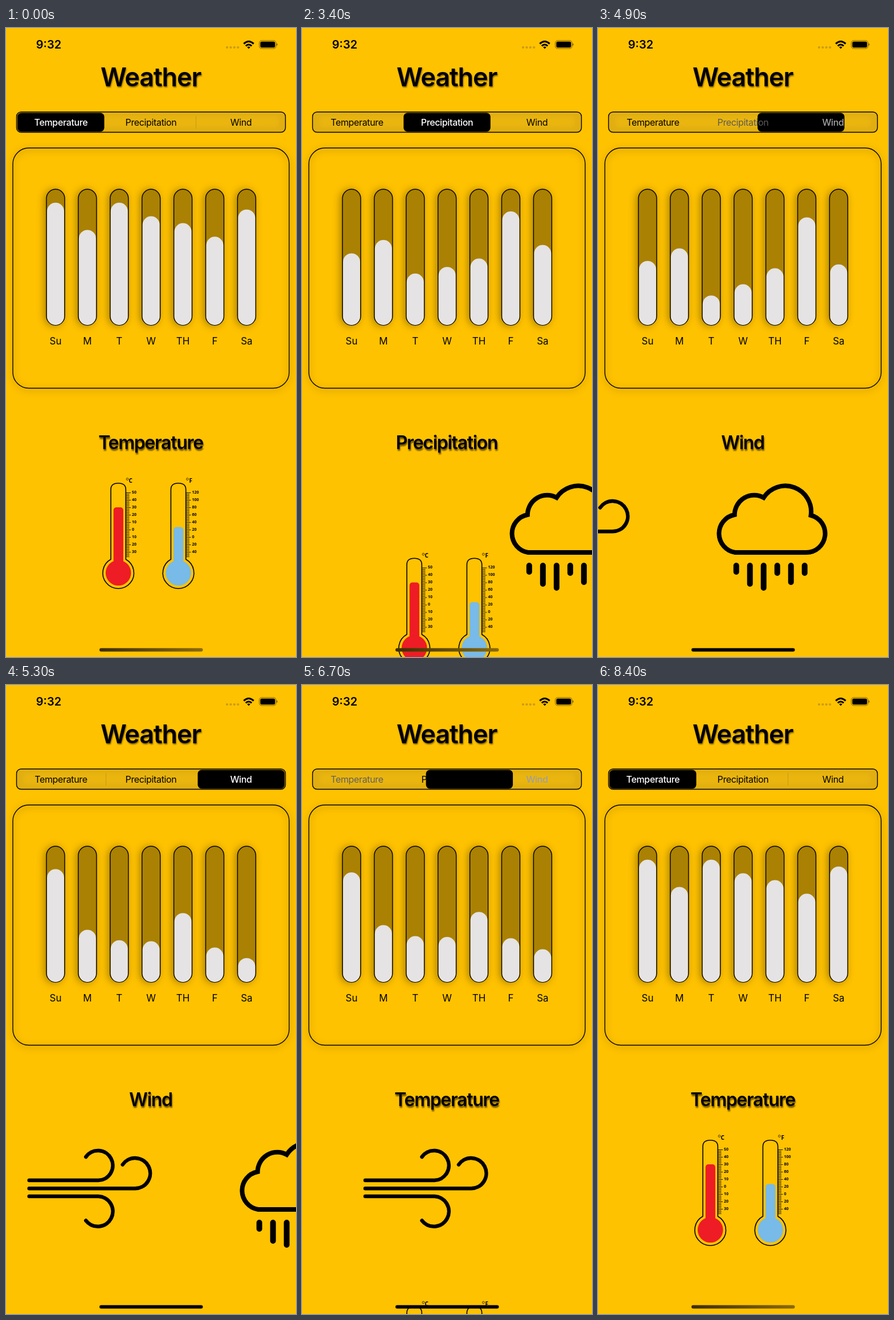
Animation of 509x1101 px, one loop 8500 ms. Source, as an HTML page:

```html
<!DOCTYPE html>
<html lang="en">
<head>
<meta charset="utf-8">
<title>Weather</title>
<style>
  html, body { margin: 0; width: 100%; height: 100%; overflow: hidden; background: #ffc200; }
  svg { display: block; width: 100%; height: 100%; font-family: Inter, Roboto, sans-serif; }
  text { text-anchor: middle; }
  .clock { font-size: 20px; font-weight: 600; }
  .heading { font-size: 45px; font-weight: 600; letter-spacing: -1.2px; filter: drop-shadow(1px 2px 1px rgba(0,0,0,.5)); }
  .caption { font-size: 32px; font-weight: 600; letter-spacing: -1.3px; filter: drop-shadow(1px 3px 1.2px rgba(0,0,0,.6)); }
  .tab { font-size: 16px; letter-spacing: -.35px; }
  .day { font-size: 17px; }
  .scale { font: bold 7px "Noto Sans", sans-serif; text-anchor: start; }
  .unit { font: bold 10px "Noto Sans", sans-serif; }
  .line { fill: none; stroke: #000; }
  .card { filter: drop-shadow(0 3px 6px rgba(0,0,0,.5)); }
  .tube { fill: #aa8102; stroke: #000; stroke-width: 1.4; filter: drop-shadow(-3px 1px 7px rgba(0,0,0,.34)); }
</style>
</head>
<body>
<svg viewBox="0 0 509 1101">
  <defs>
    <linearGradient id="homeShade">
      <stop offset="0" stop-color="#3c2d02"/>
      <stop offset=".6" stop-color="#6b5207"/>
      <stop offset="1" stop-color="#8a6a0a"/>
    </linearGradient>
    <filter id="soft" x="-5%" y="-40%" width="110%" height="180%"><feGaussianBlur stdDeviation="4"/></filter>
  </defs>
  <rect width="509" height="1101" fill="#ffc200"/>

  <text class="clock" x="75" y="36">9:32</text>
  <g id="dots" fill="#c89b18"></g>
  <g class="line" stroke-width="3">
    <path d="M417.3 27.6Q426 19.4 434.7 27.6"/>
    <path d="M420.8 31.4Q426 26.6 431.2 31.4"/>
  </g>
  <path d="M423.2 33.6Q426 31.2 428.8 33.6L426 36.6Z"/>
  <rect class="line" x="444.5" y="22" width="29.5" height="14" rx="4.2" stroke-opacity=".5"/>
  <rect x="446.3" y="23.8" width="26" height="10.4" rx="2.8"/>
  <path d="M475 26.8Q478 29 475 31.2Z" fill-opacity=".6"/>

  <text class="heading" x="254" y="102">Weather</text>

  <rect x="18.5" y="147" width="472" height="35.5" rx="8" fill="#e0ae12"/>
  <rect x="30" y="154" width="449" height="20" rx="8" fill="#eab510" filter="url(#soft)"/>
  <path id="dividers" stroke="#c79a20" stroke-width="1"/>
  <rect id="thumb" y="148.5" width="152.5" height="33" rx="7"/>
  <rect class="line" x="18.5" y="147" width="472" height="35.5" rx="8" stroke-width="1.4"/>
  <g id="tabs"></g>

  <rect class="line card" x="12" y="210" width="485" height="420.5" rx="28" stroke-width="1.4"/>
  <g id="bars"></g>
  <text id="caption" class="caption" x="254" y="737"></text>

  <g id="thermometers"></g>
  <g id="cloud" class="line" stroke-width="8">
    <path d="M229 918A33.5 33.5 0 0 1 228 852A34.5 34.5 0 0 1 279 822A45.4 45.4 0 0 1 362 853A33 33 0 0 1 354 918Z"/>
    <path id="rain" stroke-width="10" stroke-linecap="round"/>
  </g>
  <g id="wind" class="line" stroke-width="6.5" stroke-linecap="round">
    <path d="M140.5 867H262A26 26 0 1 0 240 826"/>
    <path d="M140.5 881.3H326A26.6 26.6 0 1 0 304.5 839.5"/>
    <path d="M140.5 895H262A26.4 26.4 0 1 1 240 937.5"/>
  </g>
  <rect id="home" x="164" y="1085.5" width="181.5" height="6" rx="3"/>
</svg>

<script>
const LOOP = 8500, FRAME = 100, HOLD = 3000;
const BAR_BOTTOM = 520, BAR_HEIGHT = 238;
const DAYS = ['Su', 'M', 'T', 'W', 'TH', 'F', 'Sa'];
const VIEWS = [
  { name: 'Temperature', tabX: 96.5, thumbX: 20, levels: [.9, .7, .9, .8, .75, .65, .85] },
  { name: 'Precipitation', tabX: 254.5, thumbX: 178.3, levels: [.4, .6, .2, .3, .4, .9, .5] },
  { name: 'Wind', tabX: 412.5, thumbX: 336.5, levels: [.8, .4, .3, .3, .5, .3, .2] },
];
const CHANGES = [
  { at: 3145, from: 0, to: 1 },
  { at: 4808, from: 1, to: 2 },
  { at: 6649, from: 2, to: 0 },
];
const PRESS_LEAD = 150, THUMB_LEAD = 60, THUMB_TIME = 260, SLIDE_TIME = 930;

const $ = id => document.getElementById(id);
const lerp = (a, b, p) => a + (b - a) * p;
const clamp = v => Math.min(1, Math.max(0, v));

function add(parent, tag, attrs, text) {
  const el = document.createElementNS(parent.namespaceURI, tag);
  for (const key in attrs) el.setAttribute(key, attrs[key]);
  if (text !== undefined) el.textContent = text;
  return parent.appendChild(el);
}

function spring(ms) {
  const s = Math.max(0, ms) * .0076, damping = .625, w = Math.sqrt(1 - damping ** 2);
  return 1 - Math.exp(-damping * s) * (Math.cos(w * s) + damping / w * Math.sin(w * s));
}

// Cubic bezier with control points (x1, 0) and (x2, 1), solved by bisection.
function ease(x, x1, x2) {
  let low = 0, high = 1;
  for (let i = 0; i < 24; i++) {
    const u = (low + high) / 2, v = 1 - u;
    if (3 * v * v * u * x1 + 3 * v * u * u * x2 + u ** 3 < x) low = u; else high = u;
  }
  return low * low * (3 - 2 * low);
}
const slide = ms => ease(clamp(ms / SLIDE_TIME), 0, .58);
const glide = ms => ease(clamp(ms / THUMB_TIME), .42, .58);

function drawThermometer(dx, color, top, unit, labels) {
  const g = add($('thermometers'), 'g', { transform: `translate(${dx} 0)` });
  add(g, 'path', {
    class: 'line', 'stroke-width': 1.6,
    d: 'M184 930V808Q184 796.8 197 796.8Q210.3 796.8 210.3 808V930A27.3 27.3 0 1 1 184 930Z',
  });
  add(g, 'rect', { x: 188.7, y: top, width: 17.2, height: 945 - top, rx: 5, fill: color });
  add(g, 'circle', { cx: 197.2, cy: 953.8, r: 22.3, fill: color });
  let ticks = '';
  for (let i = 0; i < 44; i++) ticks += `M210.5 ${(813.5 + i * 2.6).toFixed(1)}h${i % 5 ? 6 : 8.5}`;
  add(g, 'path', { class: 'line', 'stroke-width': .9, d: ticks });
  labels.forEach((label, i) => add(g, 'text', { class: 'scale', x: 221, y: 814.6 + i * 13 }, label));
  add(g, 'circle', { class: 'line', 'stroke-width': .7, cx: 213, cy: 789.6, r: 1.9 });
  add(g, 'text', { class: 'unit', x: 218.8, y: 795.5 }, unit);
}

for (let i = 0; i < 4; i++) add($('dots'), 'circle', { cx: 388 + i * 6.4, cy: 34, r: 2.1 });
const tabs = VIEWS.map(v => add($('tabs'), 'text', { class: 'tab', x: v.tabX, y: 170.8 }, v.name));
const bars = DAYS.map((day, i) => {
  const x = 87 + i * 55.9;
  add($('bars'), 'rect', { class: 'tube', x: x - 16, y: 282.3, width: 32, height: 238, rx: 16 });
  add($('bars'), 'text', { class: 'day', x, y: 554.3 }, day);
  return add($('bars'), 'rect', { x: x - 15, width: 30, rx: 15, fill: '#e5e3e4' });
});
drawThermometer(0, '#ee1c25', 839, 'C', [50, 40, 30, 20, 10, 0, 10, 20, 30]);
drawThermometer(105.4, '#78bae8', 873.5, 'F', [120, 100, 80, 60, 40, 20, 0, 20, 40]);
$('rain').setAttribute('d', [952, 973, 980, 954, 970, 954].map((end, i) => `M${231 + i * 24} 941V${end}`).join(''));

function render(t) {
  const change = CHANGES.filter(c => t >= c.at - PRESS_LEAD).pop() || { at: Infinity, from: 0, to: 0 };
  const age = t - change.at;
  const from = VIEWS[change.from], to = VIEWS[change.to];
  const thumb = glide(age + THUMB_LEAD), level = spring(age), moved = slide(age);
  const presence = (i, p) => change.from === change.to ? +(i === change.to)
    : i === change.to ? p : i === change.from ? 1 - p : 0;

  $('thumb').setAttribute('x', lerp(from.thumbX, to.thumbX, thumb));
  tabs.forEach((tab, i) => {
    const p = presence(i, thumb), shade = Math.round(255 * p);
    tab.setAttribute('fill', `rgb(${shade},${shade},${shade})`);
    tab.setAttribute('font-weight', p > .5 ? 500 : 400);
    const pressed = i === change.to && i !== change.from && age < -THUMB_LEAD;
    tab.setAttribute('fill-opacity', pressed ? .75 : 1);
  });
  const settled = thumb === 0 ? change.from : thumb > .99 ? change.to : 1;
  $('dividers').setAttribute('d', settled === 0 ? 'M333.5 154V176' : settled === 2 ? 'M175.5 154V176' : '');

  bars.forEach((bar, i) => {
    const height = BAR_HEIGHT * lerp(from.levels[i], to.levels[i], level);
    bar.setAttribute('y', BAR_BOTTOM - height);
    bar.setAttribute('height', height);
  });

  $('caption').textContent = (age >= 0 ? to : from).name;
  const place = (id, x, y) => $(id).setAttribute('transform', `translate(${x} ${y})`);
  place('thermometers', 0, 320 * (1 - presence(0, moved)));
  place('cloud', -46 + 363 * (1 - presence(1, moved)), 0);
  place('wind', 3 - 361 * (1 - presence(2, moved)), 0);
  $('home').setAttribute('fill', t >= 4600 && t < 6900 ? '#000' : 'url(#homeShade)');
}

function tick() {
  const t = performance.now() % LOOP;
  render(t < HOLD ? 0 : Math.floor(t / FRAME) * FRAME);
  requestAnimationFrame(tick);
}
tick();
</script>
</body>
</html>
```
